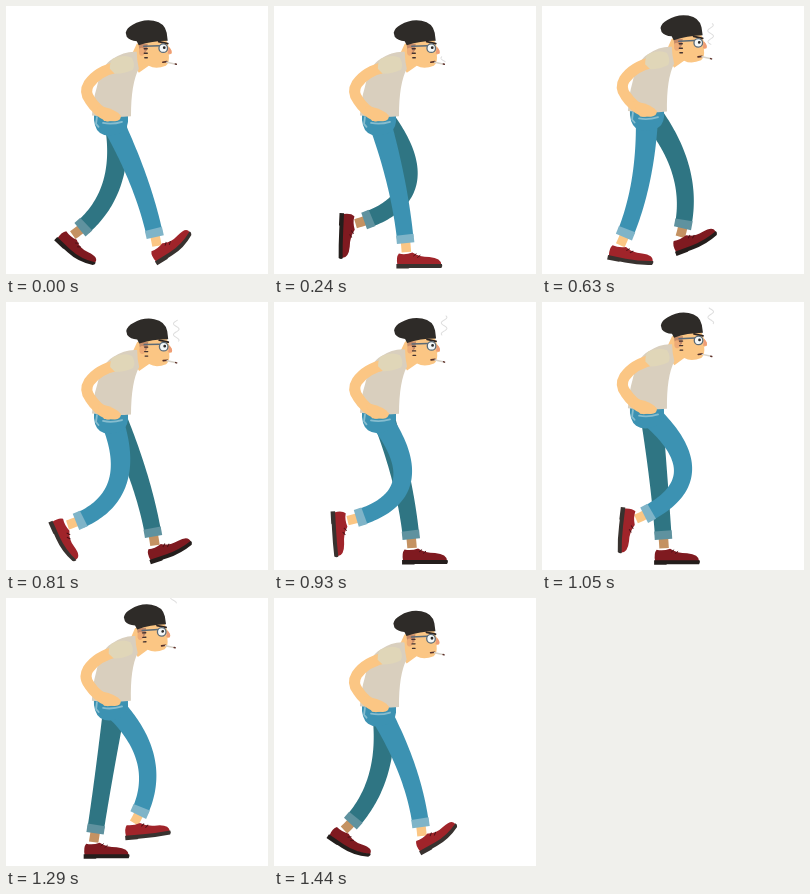
Recreate the animation shown at these times as an HTML page. Size 262 by 268 pixels, loop 1.47 s.

```html
<!DOCTYPE html>
<html lang="en">
<head>
<meta charset="utf-8">
<title>Walk cycle</title>
<style>
  html, body { margin: 0; width: 100%; height: 100%; overflow: hidden; background: #fff; }
  svg { display: block; width: 100vw; height: 100vh; }
</style>
</head>
<body>
<svg viewBox="0 0 262 268">
  <g id="far"></g>
  <g id="near"></g>
  <g id="body" stroke-linecap="round" stroke-linejoin="round">
    <path d="M88 108H122V117Q121 126 113 129Q101 133 94 128Q87 123 88 108Z" fill="#3c92b2"/>
    <path d="M91 112L90 119L92.500 122" fill="none" stroke="#86bdcf" stroke-width="1.800"/>
    <!-- head -->
    <path d="M124 54L131 39L160 34L163 42Q167 46 165.500 49L163 50Q164 58 160 61Q150 65 143 61L133 68Z" fill="#fbc684"/>
    <path d="M163 42Q167 46 165.500 49L162 49Z" fill="#ee9c76"/>
    <path d="M133 39H142L141 46L137 50Q133 47 133 39Z" fill="#c58a68"/>
    <ellipse cx="136" cy="47" rx="2.800" ry="4" fill="#eeab76"/>
    <path d="M138.500 44h3M138.500 48.500h3M139 53h2.500" stroke="#433230" stroke-width="1.400"/>
    <path d="M120 28Q121 23 127 20Q137 14 148 16Q159 18 161 28L162 36Q146 36 133 40.500L131 36.500Q124 36 121 32Z" fill="#2e2b28"/>
    <path d="M153 37L162 39" stroke="#2e2522" stroke-width="1.800"/>
    <path d="M138 41.500L154 41" stroke="#5b6b78" stroke-width="1.500"/>
    <circle cx="157.500" cy="43.500" r="4.300" fill="#f4f8f8" stroke="#5b6b78" stroke-width="1.300"/>
    <circle cx="158.500" cy="43" r="1.400" fill="#2b2a2a"/>
    <path d="M157 57.500L161 57" stroke="#54302a" stroke-width="1.600"/>
    <path d="M161 57.500L169 59.300" stroke="#d9d4cb" stroke-width="1.500"/>
    <path d="M169.500 59.400L170.500 59.700" stroke="#5c3029" stroke-width="1.500"/>
    <path id="smoke" fill="none" stroke="#dedede"/>
    <!-- shirt -->
    <path d="M131 47Q131 56 133 64Q125 79 125 111.500Q106 113 86 110.500Q87 95 91 82Q96 60 107 54Q119 46 131 47Z" fill="#d9cfbe"/>
    <!-- arm -->
    <path d="M112 62Q92 66 83 79Q78 87 84 95Q91 106 102 111" fill="none" stroke="#fbc684" stroke-width="11"/>
    <path d="M91 101Q104 102 112 108L115 111Q115 116 109 116.500L98 116Z" fill="#fbc684"/>
    <path d="M97 118Q106 120 116 117" fill="none" stroke="#86bdcf" stroke-width="1.800"/>
    <path d="M107 54Q118 49 126 53Q130 60 127 65Q119 69 109 69L104 64Q104 57 107 54Z" fill="#e0d6b8"/>
  </g>
</svg>
<script>
const LOOP = 1470, HALF = LOOP / 2, STEP = 30, TAU = Math.PI * 2;

// Foot path: time, ankle x, ankle y, foot angle
const STRIDE = [
  [0, 151, 240, -32],
  [170, 141, 246, 0],
  [560, 87, 244, 0],
  [705, 70, 232, 34],
  [810, 61.5, 223, 66],
  [1050, 94, 217, 97],
  [1290, 128, 225, -5],
  [1440, 148, 238, -29]
];

const $ = id => document.getElementById(id);
const mod = (a, n) => ((a % n) + n) % n;
const mix = (a, b, u) => a + (b - a) * u;
const fix = p => p.map(v => v.toFixed(2)).join(' ');
const poly = pts => 'M' + pts.map(fix).join('L');

// Smooth cyclic curve through the keys, level at every peak
function footAt(time) {
  const t = mod(time, LOOP), n = STRIDE.length;
  const key = i => {
    const k = STRIDE[mod(i, n)];
    return [k[0] + Math.floor(i / n) * LOOP, ...k.slice(1)];
  };
  let i = n - 1;
  while (STRIDE[i][0] > t) i--;
  const [a, b, c, d] = [i - 1, i, i + 1, i + 2].map(key);
  const h = c[0] - b[0], u = (t - b[0]) / h;
  const slope = (p, q, r, j) =>
    (q[j] - p[j]) * (r[j] - q[j]) > 0 ? (r[j] - p[j]) / (r[0] - p[0]) * h : 0;
  return [1, 2, 3].map(j => {
    const m = slope(a, b, c, j), w = slope(b, c, d, j), rise = c[j] - b[j];
    return b[j] + u * (m + u * (3 * rise - 2 * m - w + u * (m + w - 2 * rise)));
  });
}

// Shoe outline with the toe bent up by e
const upper = e => `M-9 13Q-10.500 5-7.500 1.500Q-1 3 6 .5Q13 5 23 ${5 - e * 0.4}Q35 ${6 - e} 35 ${13 - e}Q22 13 8 13Z`;
const sole = e => `M-10 12H8Q22 12 35.500 ${12 - e}Q36.500 ${14 - e} 35 ${16 - e}Q22 16 8 16H3L2 16.500H-10Z`;

function makeLeg(id, color) {
  $(id).innerHTML = `<path fill="${color.skin}"/>
    <g><path fill="${color.shoe}"/><path d="M7 4l3-2.500M11 5.500l3-2.500" stroke="#4d1116"/><path fill="${color.sole}"/></g>
    <path fill="${color.jeans}"/><path fill="${color.cuff}"/>`;
  const [shin, shoe, cloth, hem] = $(id).children;
  return (t, hx, hy) => {
    const [fx, fy, turn] = footAt(t);
    // The closer the foot is to the hip, the more the leg bends
    const dx = fx - hx, dy = fy - hy, reach = Math.hypot(dx, dy);
    const bend = 2 * Math.max(0, 1.35 * (138 - reach)) / reach;
    const cx = hx + 0.56 * dx + bend * dy, cy = hy + 0.56 * dy - bend * dx;

    const N = 60, pts = [];
    for (let i = 0; i <= N; i++) {
      const s = i / N;
      const ax = mix(hx, cx, s), ay = mix(hy, cy, s), bx = mix(cx, fx, s), by = mix(cy, fy, s);
      const len = Math.hypot(bx - ax, by - ay);
      pts.push({ x: mix(ax, bx, s), y: mix(ay, by, s), nx: (ay - by) / len, ny: (bx - ax) / len,
        w: 16.5 + 6 * (1 - s) ** 2, left: 0 });
    }
    for (let i = N - 1; i >= 0; i--) {
      const p = pts[i], q = pts[i + 1];
      p.left = q.left + Math.hypot(p.x - q.x, p.y - q.y);
    }
    // Part of the leg between two distances from the ankle
    const part = (from, to) => pts.filter(p => p.left <= from && p.left >= to);
    const cut = d => {
      let i = N - 1;
      while (i > 0 && pts[i].left < d) i--;
      const p = pts[i], q = pts[i + 1], u = (p.left - d) / (p.left - q.left), o = {};
      for (const k in p) o[k] = mix(p[k], q[k], u);
      return o;
    };
    const band = (list, width) => {
      const side = k => list.map(p => [p.x + k * p.nx * width(p) / 2, p.y + k * p.ny * width(p) / 2]);
      return poly([...side(1), ...side(-1).reverse()]) + 'Z';
    };
    shin.setAttribute('d', band([cut(14), ...part(14, -2)], () => 9.5));
    cloth.setAttribute('d', band([...part(999, 14), cut(14)], p => p.w));
    hem.setAttribute('d', band([cut(17.5), cut(9)], () => 17.5));

    const e = 8 * Math.abs(Math.sin(turn * TAU / 180));
    shoe.children[0].setAttribute('d', upper(e));
    shoe.children[2].setAttribute('d', sole(e));
    shoe.setAttribute('transform', `translate(${fix([fx, fy])}) rotate(${turn.toFixed(2)})`);
  };
}

const nearLeg = makeLeg('near', { skin: '#fbc684', shoe: '#a0242a', sole: '#38322f', jeans: '#3c92b2', cuff: '#7fb4c8' });
const farLeg = makeLeg('far', { skin: '#c49262', shoe: '#7f1a20', sole: '#241e1c', jeans: '#2f7583', cuff: '#5f929f' });

// A wavy thread that rises from the cigarette and fades from below
function drawSmoke(t) {
  const p = (t - 180) / 1220, pts = [];
  if (p > 0 && p < 1) {
    const low = mix(58, 9, p ** 1.35), top = mix(9, 58, (1 - p) ** 2.5);
    for (let i = 0; i <= 30; i++) {
      const y = mix(low, top, i / 30);
      pts.push([170 + 2.8 * Math.sin((y - 12.2) * TAU / 11), y]);
    }
  }
  $('smoke').setAttribute('d', pts.length ? poly(pts) : '');
}

function draw(t) {
  const bob = 5.3 * Math.cos((t - 120) * TAU / HALF) - 3.9;
  farLeg(t + HALF, 109, 114 + bob);
  nearLeg(t, 105, 115 + bob);
  drawSmoke(t);
  $('body').setAttribute('transform', `translate(0 ${bob.toFixed(2)}) rotate(${(bob * 0.17).toFixed(3)} 106 115)`);
}

const start = performance.now();
function tick() {
  const t = mod(performance.now() - start, LOOP);
  draw(Math.floor(t / STEP) * STEP);
  requestAnimationFrame(tick);
}
tick();
</script>
</body>
</html>
```
